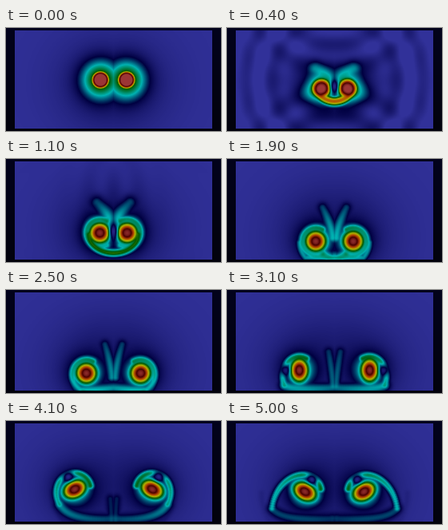
Animation of 269x129 px, one loop 5100 ms. Source, as a matplotlib script:

```python
import numpy as np
import matplotlib.pyplot as plt
from matplotlib.animation import FuncAnimation
from matplotlib.colors import LinearSegmentedColormap

W, H, DPI = 269, 129, 100
FRAMES, STEP = 51, 100
LEFT, TOP, FLOOR, AXIS = 11, 3, 126, 134
START_Y = 64.5
LIGHT = 0.70

STOPS = [(0.278, 0.278, 0.859), (0, 0, 0.361), (0, 1, 1), (0, 0.502, 0),
         (1, 1, 0), (1, 0.38, 0), (0.42, 0, 0), (0.878, 0.302, 0.302)]
CMAP = LinearSegmentedColormap.from_list("rainbow", STOPS, N=512)

# Path of the left core: seconds, distance from the axis, height on the stage
KEY_T = np.array([0, 0.4, 1.1, 1.9, 3.1, 4.1, 5.0])
KEY_U = np.array([16.3, 16.3, 17, 23.5, 44, 48.5, 37])
KEY_Y = np.array([64.5, 75, 92, 102.5, 100, 85, 88])

# The picture is symmetric, so only the left half is worked out.
Y, X = np.mgrid[TOP:FLOOR, LEFT:AXIS + 1].astype(float)
F = np.linspace(0, 1, 60)


def glide(values, t):
    """Cubic Hermite through the key values."""
    slopes = np.gradient(values, KEY_T)
    i = min(np.searchsorted(KEY_T, t, side="right") - 1, len(KEY_T) - 2)
    h = KEY_T[i + 1] - KEY_T[i]
    q = (t - KEY_T[i]) / h
    return ((1 + 2 * q) * (1 - q) ** 2 * values[i]
            + q * (1 - q) ** 2 * h * slopes[i]
            + q * q * (3 - 2 * q) * values[i + 1]
            + q * q * (q - 1) * h * slopes[i + 1])


def ease(t, start, end):
    q = np.clip((t - start) / (end - start), 0, 1)
    return q * q * (3 - 2 * q)


def polar(x, y, r, degrees):
    a = np.radians(degrees)
    return x + r * np.cos(a), y - r * np.sin(a)


def oval(x, y, rx, ry, degrees=0.0):
    """Distance from a centre, 1 on the ellipse; degrees turn upwards."""
    a = np.radians(degrees)
    dx, dy = X - x, Y - y
    u = dx * np.cos(a) - dy * np.sin(a)
    v = dx * np.sin(a) + dy * np.cos(a)
    return np.hypot(u / rx, v / ry)


def stroke(px, py, width, start, end):
    """Soft line through the points, its strength going from start to end."""
    near = np.full(X.shape, 1e9)
    along = np.zeros(X.shape)
    for x, y, f in zip(px, py, F):
        d = (X - x) ** 2 + (Y - y) ** 2
        closer = d < near
        near[closer] = d[closer]
        along[closer] = f
    return (start + (end - start) * along) * np.exp(-near / width ** 2)


def belt(cy, t):
    """Widening bowl that the pair pushes ahead of itself."""
    a = np.pi * (1 + F / 2)
    px = AXIS + (14 + 15.5 * t) * np.cos(a)
    py = np.minimum(cy + 2 - (9 + 13 * t) * np.sin(a), FLOOR - 3)
    power = 0.95 * np.exp(-0.75 * t) * ease(t, 0, 0.35)
    return stroke(px, py, 4 + 3 * np.exp(-t), 0.8 * power, power)


def plume(t):
    """Wake above the pair, bending away from the axis."""
    base, tip = 64 + 18 * t, 50 + 2.8 * t * t
    reach = 22 * np.exp(-(t / 2.6) ** 2)
    power = 0.26 * np.exp(-t / 8) * ease(t, 0, 0.4)
    return stroke(AXIS - 2 - reach * F ** 1.5, base + (tip - base) * F,
                  max(5.5, 11 - 2.6 * t), power, 0.65 * power)


def spiral(cx, cy, t):
    """Layer wound around the core, its outer end opening late."""
    first = 60 - 50 * ease(t, 3, 4.3)
    last = 300 - 75 * ease(t, 1.9, 3.1) - 18 * ease(t, 4.1, 5)
    inner = 17 + 3 * ease(t, 3, 4.1)
    outer = 18 + 9 * ease(t, 1.5, 3.3) + 20 * ease(t, 4.1, 5.1)
    return polar(cx, cy, inner + (outer - inner) * F ** 4,
                 first + (last - first) * F)


def trail(x, y, t):
    """Layer left on the floor between the spiral's end and the axis."""
    px = (1 - F) ** 2 * x + 2 * F * (1 - F) * (x + 12) + F ** 2 * AXIS
    py = (1 - F) ** 2 * y + 2 * F * (1 - F) * FLOOR + F ** 2 * (FLOOR - 4)
    power = (0.32 - 0.03 * t) * ease(t, 1.1, 1.9)
    return stroke(px, py, 7, power, 0.8 * power)


def waves(t):
    """Pressure rings from the start, with echoes off lid, floor and sides."""
    total = np.zeros(X.shape)
    sources = [(AXIS, START_Y, 1.0),
               (AXIS, 2 * FLOOR - START_Y, 0.8), (AXIS, 2 * TOP - START_Y, 0.8),
               (2 * LEFT - AXIS, START_Y, 0.5), (3 * AXIS - 2 * LEFT, START_Y, 0.5)]
    for sx, sy, gain in sources:
        lag = np.hypot(X - sx, Y - sy) - 237 * t
        total -= gain * np.cos(lag * np.pi / 18) * np.exp(-(lag / 34) ** 2)
    return 0.055 * total * np.exp(-0.8 * t) * ease(t, 0, 0.2)


def field(t):
    cx, cy = AXIS - glide(KEY_U, t), glide(KEY_Y, t)
    young = np.exp(-3 * t)
    late = ease(t, 2.4, 3.3)

    # A weak partner circles the core, which stretches across their line.
    turn = 180 - 63 * (t - 3.1)
    ex, ey = polar(cx, cy, 18, turn)
    stretch = 1 + 0.17 * late
    size = 12.4 - 1.8 * young
    core = oval(cx, cy, size * stretch, size / stretch, turn - 90)

    sx, sy = spiral(cx, cy, t)
    skin = (0.28 + 0.06 * late) * ease(t, 0.5, 1.1)
    parts = [(0.96 + 0.15 * young) * np.exp(-core ** (2.1 + 2.9 * young)),
             (0.25 + 0.19 * np.exp(-1.5 * t))
             * np.exp(-oval(cx, cy, 19 + 3 * young, 19 + 3 * young) ** 2),
             belt(cy, t), plume(t),
             stroke(sx, sy, 4.8, skin, 0.75 * skin),
             trail(sx[-1], sy[-1], t)]
    v = sum(p ** 4 for p in parts) ** 0.25

    haze = (0.10 / (1 + oval(cx, cy, 32, 32) ** 2)
            + 0.045 * np.exp(-oval(AXIS, 78, 58, 52) ** 2))
    v += haze * (1 - np.clip(v, 0, 1))

    gap = 0.92 * ease(t, 0.05, 0.35) * (1 - ease(t, 1.1, 1.9))
    v *= 1 - gap * np.exp(-oval(AXIS, cy - 2, 5, 8 + 4 * t) ** 2)
    v *= 1 - 0.88 * late * np.exp(-oval(ex, ey, 5 + 2.2 * late, 5.6, turn - 90) ** 2)
    return v + waves(t)


def backdrop():
    image = np.zeros((H, W, 3))
    image[..., :2] = 0.01
    image[..., 2] = np.linspace(0.11, 0.05, H)[:, None]
    return image


def picture(n):
    half = field(n * STEP / 1000)
    full = np.hstack([half, half[:, -2::-1]])
    image = backdrop()
    image[TOP:FLOOR, LEFT:LEFT + full.shape[1]] = (
        CMAP(np.clip(full, 0, 1))[..., :3] * LIGHT)
    return image


fig = plt.figure(figsize=(W / DPI, H / DPI), dpi=DPI, facecolor="black")
ax = fig.add_axes([0, 0, 1, 1])
ax.axis("off")
view = ax.imshow(picture(0), interpolation="nearest", aspect="auto")


def update(n):
    view.set_data(picture(n))
    return [view]


anim = FuncAnimation(fig, update, frames=FRAMES, interval=STEP,
                     repeat=True, repeat_delay=0, blit=False)
plt.show()
```
